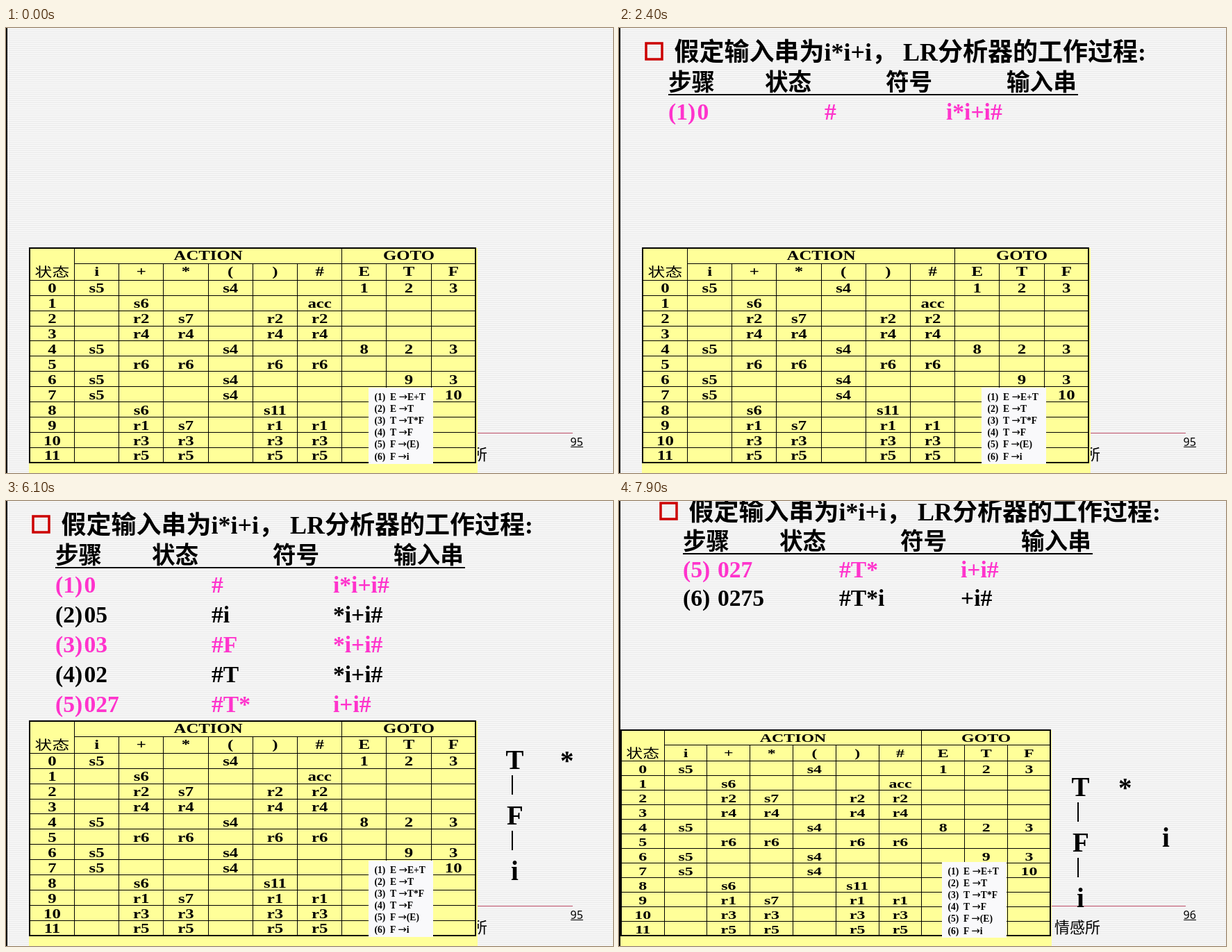
Write an HTML page that moves like this. It is 874 by 641 pixels and loops after 8000 ms.

```html
<!DOCTYPE html>
<html lang="zh-CN">
<head>
<meta charset="utf-8">
<title>LR 分析过程</title>
<style>
  html, body { margin: 0; width: 100%; height: 100%; overflow: hidden; background: #f3f3f3; }
  svg { display: block; width: 874px; height: 641px; }
  text { font-family: "Liberation Serif", "Noto Sans CJK SC", serif; font-weight: 700; white-space: pre; }
  .title { font-size: 36px; }
  .step { font-size: 33.6px; }
  .node { font-size: 39px; }
  .cell { font-size: 18.5px; text-anchor: middle; }
  .rule { font-size: 13.6px; }
  .arrow { font: 400 15px "DejaVu Sans", sans-serif; }
  .plain { font-weight: 400; }
  .foot { font: 400 22px "Noto Sans CJK SC", sans-serif; }
  .page { font: 400 16px "Noto Sans", sans-serif; }
  .grid { stroke: #000; fill: none; shape-rendering: crispEdges; vector-effect: non-scaling-stroke; }
</style>
</head>
<body>
<svg id="stage" viewBox="0 0 874 641">
  <defs>
    <pattern id="stripes" width="6" height="3" patternUnits="userSpaceOnUse">
      <rect width="6" height="3" fill="#f6f6f6"/>
      <rect y="2" width="6" height="1" fill="#ebebeb"/>
    </pattern>
  </defs>
</svg>
<script>
const W = 874, H = 641, LOOP = 8000, TICK = 100;
const PINK = '#ff33cc', BLACK = '#000';
const stage = document.getElementById('stage');
const defs = stage.querySelector('defs');
const tracks = [];

function add(parent, tag, attrs = {}, text) {
  const el = document.createElementNS('http://www.w3.org/2000/svg', tag);
  for (const key in attrs) el.setAttribute(key, attrs[key]);
  if (text !== undefined) el.textContent = text;
  parent.appendChild(el);
  return el;
}

const group = (parent, attrs) => add(parent, 'g', attrs);
const rect = (parent, x, y, width, height, fill) => add(parent, 'rect', { x, y, width, height, fill });
const write = (parent, cls, x, y, text, fill = BLACK) => add(parent, 'text', { class: cls, x, y, fill }, text);

// A mask filled with a gradient from opaque to clear.
let ids = 0;
function gradientMask(target, attrs) {
  const id = 'm' + ids++;
  const grad = add(defs, 'linearGradient', { id: id + 'g', gradientUnits: 'userSpaceOnUse', ...attrs });
  const stops = [1, 0].map(opacity => add(grad, 'stop', { offset: 1 - opacity, 'stop-color': '#fff', 'stop-opacity': opacity }));
  const mask = add(defs, 'mask', { id, maskUnits: 'userSpaceOnUse', x: 0, y: 0, width: W, height: H });
  rect(mask, 0, 0, W, H, `url(#${id}g)`);
  target.setAttribute('mask', `url(#${id})`);
  return { grad, stops };
}

// Soft wipe from left to right between x0 and x1.
function wipe(target, x0, x1, start, length, soft = 0.15) {
  const { grad } = gradientMask(target, { y1: 0, y2: 0 });
  tracks.push({ start, length, target, draw(p) {
    const lead = p * (1 + soft);
    grad.setAttribute('x1', x0 + (x1 - x0) * (lead - soft));
    grad.setAttribute('x2', x0 + (x1 - x0) * lead);
  } });
}

// Soft rectangle growing from the centre, slightly taller than the stage at the end.
function boxOut(outer, inner, start, length, soft = 0.09) {
  const across = gradientMask(outer, { x1: W / 2, x2: W, y1: 0, y2: 0, spreadMethod: 'reflect' });
  const down = gradientMask(inner, { x1: 0, x2: 0, y1: H / 2, y2: H + 12, spreadMethod: 'reflect' });
  tracks.push({ start, length, target: outer, draw(p) {
    const lead = p * (1 + soft);
    for (const { stops } of [across, down]) {
      stops[0].setAttribute('offset', Math.max(0, lead - soft));
      stops[1].setAttribute('offset', lead);
    }
  } });
}

const ROWS = [
  's5,,,s4,,,1,2,3', ',s6,,,,acc,,,', ',r2,s7,,r2,r2,,,', ',r4,r4,,r4,r4,,,',
  's5,,,s4,,,8,2,3', ',r6,r6,,r6,r6,,,', 's5,,,s4,,,,9,3', 's5,,,s4,,,,,10',
  ',s6,,,s11,,,,', ',r1,s7,,r1,r1,,,', ',r3,r3,,r3,r3,,,', ',r5,r5,,r5,r5,,,'
];
const RULES = ['E→E+T', 'E→T', 'T→T*F', 'T→F', 'F→(E)', 'F→i'];

function parseTable(slide, x, y, sx, sy) {
  const g = group(slide, { transform: `translate(${x} ${y}) scale(${sx} ${sy})` });
  const width = 642, height = 309, col = 64.2, row = 21.92, top = 46;
  const line = (d, w = 1) => add(g, 'path', { class: 'grid', d, 'stroke-width': w });
  const cell = (cx, cy, text, cls = '') => add(g, 'text', {
    class: 'cell ' + cls, transform: `translate(${cx} ${cy}) scale(1.34 1)`
  }, text);

  line(`M${col} 22H${width}`);
  for (let r = 0; r < 12; r++) line(`M0 ${top + r * row}H${width}`);
  for (let c = 1; c < 10; c++) line(`M${c * col} ${c === 1 || c === 7 ? 0 : 22}V${height}`);
  line(`M0 0H${width}V${height}H0Z`, 2);

  cell(col * 4, 17, 'ACTION');
  cell(col * 8.5, 17, 'GOTO');
  cell(col / 2, 41, '状态', 'plain');
  [...'i+*()#ETF'].forEach((s, c) => cell(col * (c + 1.5), 40, s));
  ROWS.forEach((cells, r) => {
    const base = top + r * row + 18;
    cell(col / 2, base, r);
    cells.split(',').forEach((s, c) => s && cell(col * (c + 1.5), base, s));
  });
}

function rules(slide, x, y, height) {
  rect(slide, x, y, 93, height, '#f9f9fb');
  RULES.forEach((rule, i) => {
    const base = y + 18 + i * 17.1;
    const [left, right] = rule.split('→');
    write(slide, 'rule', x + 8.5, base, `(${i + 1})`);
    const text = write(slide, 'rule', x + 31, base, left + ' ');
    add(text, 'tspan', { class: 'arrow' }, '→');
    add(text, 'tspan', {}, right);
  });
}

function backdrop(slide, page) {
  rect(slide, 0, 0, W, H, 'url(#stripes)');
  rect(slide, 0, 0, 2, H, BLACK);
  rect(slide, 600, 583, 216, 1, '#c0506a');
  write(slide, 'foot', 627, 622, '情感所');
  write(slide, 'page', 812.5, 602, page);
  rect(slide, 813, 603, 18, 1, BLACK);
}

function title(slide, x, y) {
  const g = group(slide);
  add(g, 'rect', { x: x - 40.5, y: y - 25, width: 23, height: 23, fill: 'none', stroke: '#cc0000', 'stroke-width': 3.5 });
  write(g, 'title', x, y, '假定输入串为i*i+i， LR分析器的工作过程:');
  return g;
}

function header(slide, x, y) {
  const g = group(slide);
  [['步骤', 0], ['状态', 139], ['符号', 313], ['输入串', 487]].forEach(([s, dx]) => write(g, 'step', x + dx, y, s));
  rect(g, x, y + 5, 590, 2, BLACK);
  return g;
}

function step(slide, x, y, fill, cells, gap) {
  const g = group(slide);
  [0, gap, 225, 400].forEach((dx, i) => write(g, 'step', x + dx, y, cells[i], fill));
  return g;
}

function node(slide, x, y, label, stem) {
  const g = group(slide);
  write(g, 'node', x, y, label);
  if (stem) rect(g, stem, y + 9, 2, 28, BLACK);
  return g;
}

// First slide
const first = group(stage);
backdrop(first, '95');
rect(first, 33, 317, 646, 324, '#ffff99');
parseTable(first, 34.3, 317.3, 1, 1);
rules(first, 522, 518, 110);
wipe(title(first, 79.5, 47), 37, 763, 1250, 500);
wipe(header(first, 71, 90), 72, 661, 1250, 500);
[
  [['(1)', '0', '#', 'i*i+i#'], 1900, 552],
  [['(2)', '05', '#i', '*i+i#'], 2500, 543],
  [['(3)', '03', '#F', '*i+i#'], 3700, 543],
  [['(4)', '02', '#T', '*i+i#'], 4500, 543],
  [['(5)', '027', '#T*', 'i+i#'], 5200, 526]
].forEach(([cells, start, right], i) =>
  wipe(step(first, 71, 132 + i * 43, i % 2 ? BLACK : PINK, cells, 41.5), 72, right, start, 500));
wipe(node(first, 727, 546, 'i'), 727, 738, 3400, 200, 0.5);
wipe(node(first, 721, 466, 'F', 728), 721, 744, 4200, 300, 0.5);
wipe(node(first, 719.5, 386, 'T', 728), 721, 744, 5000, 200, 0.5);
wipe(node(first, 798, 387, '*'), 800, 816, 5900, 200, 0.5);

// Second slide
const outer = group(stage);
const second = group(outer);
backdrop(second, '96');
rect(second, 2, 330, 621, 311, '#ffff99');
parseTable(second, 3.3, 330.3, 0.9626, 0.958);
rules(second, 465, 520, 109);
title(second, 100.5, 28);
header(second, 92, 70);
step(second, 92, 110, PINK, ['(5)', '027', '#T*', 'i+i#'], 50);
wipe(step(second, 92, 151, BLACK, ['(6)', '0275', '#T*i', '+i#'], 50), 92, 537, 7000, 500);
node(second, 659, 585, 'i');
node(second, 653, 505, 'F', 660);
node(second, 651.5, 425, 'T', 660);
node(second, 719, 426, '*');
wipe(node(second, 782, 498, 'i'), 782, 793, 7600, 300, 0.5);
boxOut(outer, second, 6550, 400);

function frame() {
  const t = Math.floor(performance.now() % LOOP / TICK) * TICK;
  for (const { start, length, target, draw } of tracks) {
    const p = Math.min(1, Math.max(0, (t - start) / length));
    target.style.display = p ? '' : 'none';
    if (p) draw(p);
  }
  requestAnimationFrame(frame);
}
frame();
</script>
</body>
</html>
```
